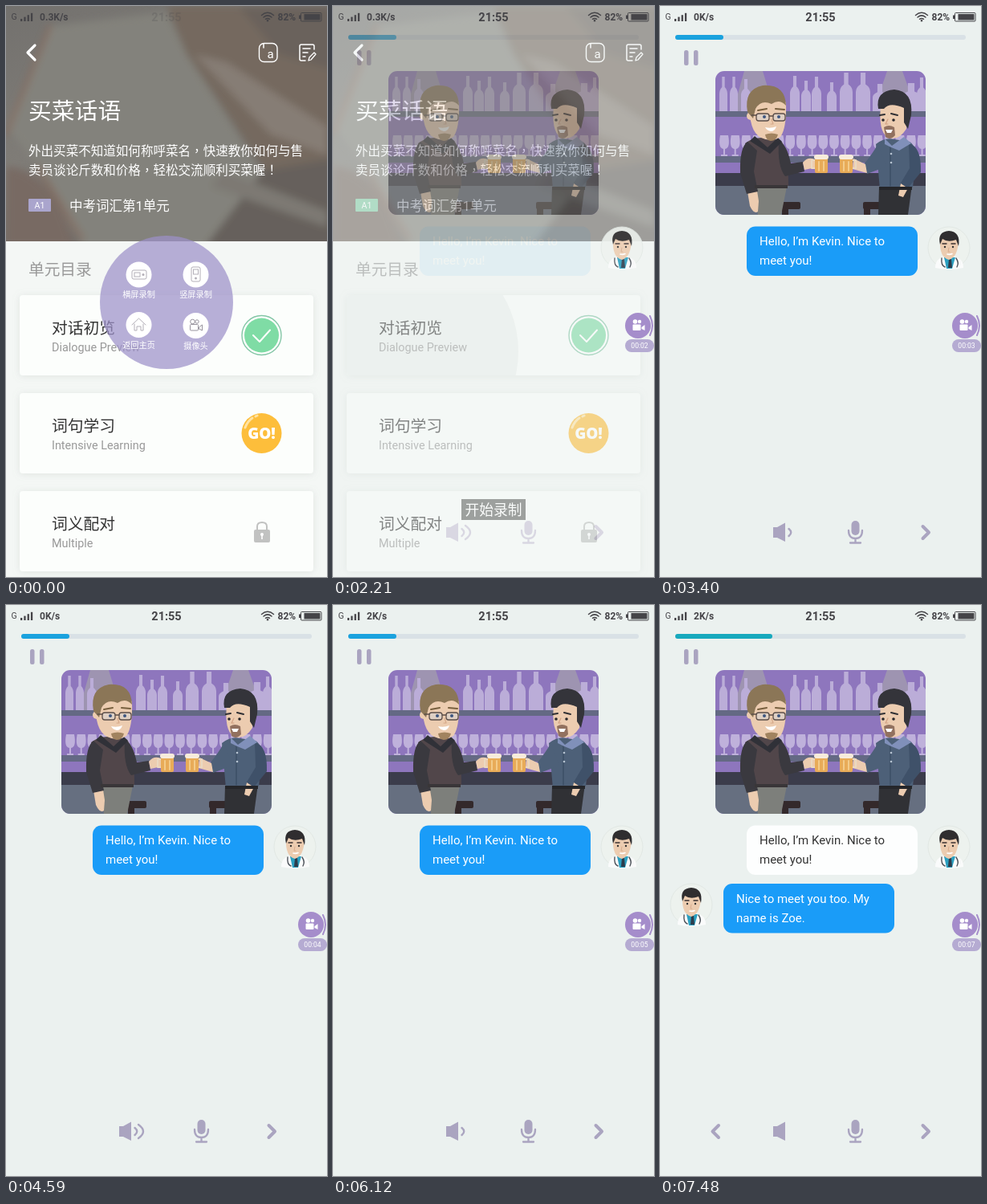
Recreate the animation shown at these times as an HTML page. Size 400 px wide and 711 px high, loop 7650 ms.

```html
<!DOCTYPE html>
<html lang="zh-CN">
<head>
<meta charset="utf-8">
<title>Lesson recording</title>
<style>
  html, body { margin: 0; height: 100%; overflow: hidden; background: #ebf1ef; }
  svg { display: block; width: 100%; height: 100%; }
  text { font-family: Roboto, "Noto Sans CJK SC", "Noto Sans CJK", sans-serif; }
  .mark { font-family: "Noto Sans CJK TC", "Noto Sans CJK", sans-serif; }
  .line { fill: none; stroke-linecap: round; stroke-linejoin: round; }
</style>
</head>
<body>
<svg id="stage" viewBox="0 0 400 711" preserveAspectRatio="none"></svg>
<script>
const LOOP = 7650, STEP = 170;
const ICON = '#aaa4c0', BLUE = '#1a9cf8', SKIN = '#ecccb0';

const attrs = (o = {}) => Object.entries(o).map(([k, v]) => ` ${k}="${v}"`).join('');
// Full-width punctuation sits in the middle of its square
const marks = str => str.replace(/[，！]/g, '<tspan class="mark" lang="zh-TW">$&</tspan>');
const text = (x, y, size, fill, str, o) =>
  `<text x="${x}" y="${y}" font-size="${size}" fill="${fill}"${attrs(o)}>${marks(str)}</text>`;
const mid = { 'text-anchor': 'middle' };
const rect = (x, y, w, h, fill, r = 0, o) =>
  `<rect x="${x}" y="${y}" width="${w}" height="${h}" rx="${r}" fill="${fill}"${attrs(o)}/>`;
const circle = (x, y, r, fill, o) => `<circle cx="${x}" cy="${y}" r="${r}" fill="${fill}"${attrs(o)}/>`;
const path = (d, fill, o) => `<path d="${d}" fill="${fill}"${attrs(o)}/>`;
const line = (d, color, w, o) => `<path class="line" d="${d}" stroke="${color}" stroke-width="${w}"${attrs(o)}/>`;
const group = (id, body, o) => `<g id="${id}"${attrs(o)}>${body}</g>`;

// Bar scene
function bottle([x, w, h]) {
  const n = w * .34, y = k => 131 - h * k;
  return path(`M${x - w} 131V${y(.5)}Q${x - w} ${y(.62)} ${x - n} ${y(.7)}V${y(1)}H${x + n}V${y(.7)}` +
    `Q${x + w} ${y(.62)} ${x + w} ${y(.5)}V131Z`, '#bbadd8');
}
const glass = x => path(`M${x - 5} 161Q${x - 8} 177 ${x - 1} 178V185H${x - 4}V187H${x + 4}V185H${x + 1}V178` +
  `Q${x + 8} 177 ${x + 5} 161Z`, '#bfb1db');
const mug = (x, side) => line(`M${x + 8 + side * 8} 192h${side * 4}v10h${-side * 4}`, '#ead9c2', 2) +
  rect(x, 187, 16, 21, '#e8ab58', 2) + rect(x - 1, 185, 18, 6, '#f7ecdc', 3) +
  line(`M${x + 5} 194v11m6-11v11`, '#f3cb8a', 2);
const stool = x => rect(x, 244, 24, 9, '#33292b', 2) + rect(x + 1, 252, 8, 8, '#33292b');

const leftMan =
  path('M118 224L159 220L151 260H122Z', '#7d7f7b') +
  path('M109 231L112 249Q117 260 122 256L123 243L121 230Z', SKIN) +
  path('M106 171Q116 163 130 164L150 167Q160 176 160 224L119 227L115 200Z', '#51464a') +
  path('M109 169Q99 176 100 208L108 234L122 231L117 206L121 180Z', '#3a393f') +
  path('M148 168Q158 172 163 196L178 194L180 206L156 212Q146 200 148 168Z', '#3a393f') +
  path('M112 168L118 162L134 176L147 164L152 169L137 184Z', '#303138') +
  path('M178 195Q184 187 193 191L194 201L180 204Z', SKIN) +
  rect(118, 223, 41, 4, '#393638') +
  path('M112 120Q110 156 126 164Q138 170 150 163Q158 152 157 120L140 108Z', SKIN) +
  circle(113, 137, 5, SKIN) +
  path('M131 160Q139 157 147 160Q145 168 138 168Q132 167 131 160Z', '#a1835f') +
  path('M109 132Q104 104 128 99Q156 97 157 124Q149 115 139 122Q126 116 119 128L116 140Z', '#8b7657') +
  rect(120, 134, 16, 9, '#dfd0c4', 3, { stroke: '#5c4f4a', 'stroke-width': 1.3 }) +
  rect(141, 134, 15, 9, '#dfd0c4', 3, { stroke: '#5c4f4a', 'stroke-width': 1.3 }) +
  line('M136 137h5M114 136h6', '#5c4f4a', 1.3) +
  circle(130, 138, 2, '#3e5680') + circle(148, 138, 2, '#3e5680') +
  line('M122 130l11-2m11 0l11 1', '#78603f', 2) +
  path('M131 151Q138 153 145 150Q143 156 138 156Q133 155 131 151Z', '#fff') +
  line('M139 141l2 6h-3', '#d5a98a', 1.2);

const rightMan =
  path('M273 225L314 223L309 260H272Z', '#303135') +
  path('M269 172Q280 163 292 166L311 169Q320 174 318 196L315 226L274 228Z', '#4d6078') +
  path('M272 171Q265 184 254 197L258 209L282 200Z', '#4d6078') +
  path('M256 197L241 190L240 203L258 208Z', SKIN) +
  path('M310 171Q326 175 325 207L308 228L299 222L311 202Z', '#3f5169') +
  path('M300 221L309 227L303 238L297 236Z', SKIN) +
  line('M287 174V224', '#35465d', 1) + circle(288, 184, 1.3, '#b8c4d2') + circle(288, 195, 1.3, '#b8c4d2') +
  path('M275 125Q272 155 283 163Q296 170 307 153L309 125L290 112Z', SKIN) +
  path('M279 151Q285 147 292 151L293 161Q287 168 281 163Z', '#92715f') +
  path('M272 128Q268 106 292 104Q316 106 313 136L309 153L304 145V127Q286 119 279 128Z', '#34343a') +
  path('M281 154H290L288 158H283Z', '#fff') +
  circle(278, 142, 1.8, '#29282b') + circle(291, 142, 1.8, '#29282b') +
  line('M274 136l6-1m8-1l8 2', '#303034', 2) +
  line('M284 141l-3 6h3', '#d2a283', 1.2) +
  path('M280 165L289 174L304 163L313 171L298 180L288 176L280 172Z', '#8090ba') +
  rect(273, 225, 41, 4, '#25262a');

const bottles = [[79, 5, 43], [92, 5, 43], [107, 6, 40], [168, 6, 44], [182, 6, 38], [195, 6, 43], [214, 6, 36],
  [232, 8, 48], [253, 9, 48], [274, 9, 34], [313, 12, 35], [326, 6, 42]].map(bottle).join('');
const glasses = Array.from({ length: 19 }, (_, i) => glass(80 + i * 13.7)).join('');

const scene = `<g clip-path="url(#sceneClip)">` +
  rect(69, 81, 262, 179, '#8e76bd') +
  path('M105 81H128L143 131H91ZM283 81H302L320 131H266Z', '#a6a1ad', { opacity: .7 }) +
  bottles + rect(69, 131, 262, 7, '#646984') + glasses + rect(69, 187, 262, 8, '#646984') +
  rect(69, 208, 262, 17, '#3b3c4b') + rect(69, 224, 262, 36, '#666f80') +
  stool(151) + stool(253) + leftMan + rightMan + mug(193, -1) + mug(224, 1) + '</g>';

// Lesson screen
const avatar = (x, y) => `<g transform="translate(${x} ${y})">` +
  circle(0, 0, 26, '#edf2ee', { stroke: '#e2e8e4' }) +
  path('M-17 25Q-17 13 -5 11H6Q18 13 18 25Q0 29 -17 25Z', '#fafbfb') +
  path('M-6 12L-3 26H4L8 12Z', '#2a9fc0') + path('M0 14h3l1 11h-5z', '#2c3c4c') +
  line('M-9 13Q-10 22 -5 24M9 13Q13 19 10 24', '#4b5058', 1.4) +
  path('M-11 -9Q-12 12 0 15Q11 12 12 -9L0 -16Z', SKIN) +
  path('M-11 -4Q-15 -20 0 -21Q15 -20 12 -2L9 -10Q-1 -6 -8 -11Z', '#2f2d2f') +
  line('M-8 -5h5m6 0h5', '#3a3030', 1.4) + circle(-5, -1, 1.2, '#333') + circle(5, -1, 1.2, '#333') +
  line('M-2 8Q1 9 4 7.5', '#fff', 1.6) + line('M0 0l-1 5h2', '#d8ac8e', 1) + '</g>';
const bubble = (id, x, y, a, b) => group(id, rect(x, y, 213, 61.5, BLUE, 11, { class: 'box' }) +
  text(x + 16, y + 23.5, 15, 'inherit', a) + text(x + 16, y + 47.5, 15, 'inherit', b), { fill: '#fff' });

const lesson = rect(0, 0, 400, 711, '#ebf1ef') +
  rect(19, 36, 362, 6, '#d9e1e6', 3) + rect(19, 36, 60, 6, '#1aa2de', 3, { id: 'progress' }) +
  rect(30, 55, 5.5, 19, ICON, 2.5) + rect(42, 55, 5.5, 19, ICON, 2.5) + scene +
  path('M141 649H146L156 643.5V667L146 662H141Z', ICON) +
  line('M160.5 651Q166 655.5 160.5 660', ICON, 2.4, { id: 'wave1' }) +
  line('M165 647Q177 655.5 165 664', ICON, 2.4, { id: 'wave2' }) +
  rect(238.5, 641, 10, 18, ICON, 5) +
  line('M235 653Q235 663 243.5 663T252 653M243.5 663V668M237 668.5H250', ICON, 2.3) +
  line('M327.5 648L335 655.5L327.5 663', ICON, 4) +
  line('M73 648L65.5 655.5L73 663', ICON, 4, { id: 'prev' });

const chat = avatar(360, 301) + bubble('first', 108, 274.5, 'Hello, I’m Kevin. Nice to', 'meet you!') +
  group('reply', avatar(39, 373) + bubble('second', 79, 347, 'Nice to meet you too. My', 'name is Zoe.'));

// Contents screen
const card = (y, title, sub) => rect(17, y, 366, 100, '#fcfefc', 4, { filter: 'url(#shadow)' }) +
  (y == 360 ? circle(95, 430, 0, '#eef2ef', { id: 'ripple', 'clip-path': 'url(#cardClip)' }) : '') +
  text(57, y + 48, 19.8, '#333', title) + text(57, y + 70, 14.4, '#999', sub);

const photo = '<g clip-path="url(#heroClip)">' + rect(0, 0, 400, 293, 'url(#hero)') + '<g filter="url(#blur)">' +
  path('M55 25L200 8L225 60L325 215L280 310H100L40 200L0 150Z', '#83827c') +
  path('M200 0H410V190L330 215L225 60Z', '#75695f') +
  path('M235 60L275 70L400 150V185L330 160Z', '#867d74') +
  path('M290 0H410V80L340 60Z', '#6a625c') +
  path('M0 200Q60 205 85 300H0Z', '#786a63') +
  path('M320 205L410 190V310H240Z', '#66605b') +
  path('M270 205L400 255V275L255 225Z', '#7d7973') +
  line('M55 25L0 160M40 200L95 290', '#86695a', 4) + '</g></g>';

const contents = rect(0, 0, 400, 711, '#f4f7f5') + photo +
  line('M36 49L27 58L36 67', '#fff', 3.2) +
  rect(315.5, 46.5, 22.5, 23, 'none', 6, { stroke: '#fff', 'stroke-width': 1.4 }) +
  line('M321 47V52', '#fff', 1.5) + text(329.5, 64.5, 15, '#fff', 'a', mid) +
  line('M384 54V50Q384 48 382 48H368Q366 48 366 50V66Q366 68 368 68H373M370 53H379M370 58H376M370 63H373', '#fff', 1.5) +
  line('M377 68L378 64L384 58L386 60L380 67Z', '#fff', 1.3) +
  text(28, 141, 28.8, '#fff', '买菜话语') +
  text(28, 186, 15.55, '#fff', '外出买菜不知道如何称呼菜名，快速教你如何与售') +
  text(28, 210, 15.55, '#fff', '卖员谈论斤数和价格，轻松交流顺利买菜喔！') +
  rect(28, 240, 28, 16, '#87cda9', 1, { id: 'badge' }) + text(42, 251.5, 10.5, '#fff', 'A1', mid) +
  text(79, 254.5, 16.5, '#fff', '中考词汇第1单元') +
  text(28, 334.5, 19.7, '#999', '单元目录') +
  card(360, '对话初览', 'Dialogue Preview') + card(482, '词句学习', 'Intensive Learning') + card(604, '词义配对', 'Multiple') +
  circle(318.5, 410, 24.5, '#fff', { stroke: '#84c6a6', 'stroke-width': 1.4 }) + circle(318.5, 410, 21.5, '#7fdca5') +
  line('M308 410L316 418L329 403.5', '#fff', 2) +
  circle(318.5, 532, 25, '#fdbe3b') + line('M298 525Q301 517 307 513M311 511L313 510', '#ffe3a2', 3) +
  text(318.5, 539, 19, '#fff', 'GO!', { ...mid, 'font-weight': 800, style: "font-family:'Open Sans',sans-serif" }) +
  rect(309, 652, 20, 16, '#c1c2c1', 2) + line('M313 652V648Q313 643 319 643T325 648V652', '#c1c2c1', 2) +
  circle(319, 658, 2, '#fff') + rect(318.2, 659, 1.6, 5, '#fff');

// Recorder overlay
const camera = (x, y, fill, stroke) => `<g transform="translate(${x} ${y})" stroke="${stroke}">` +
  circle(-4, -5, 2.8, fill) + circle(1.5, -5, 2.2, fill) +
  rect(-7, -1.5, 10, 7.5, fill, 1) + path('M4 2L8 -1V6L4 4Z', fill) + '</g>';
const option = (x, y, label, icon) => circle(x, y, 16, '#fff') + icon +
  text(x, y + 28.5, 10.2, '#fff', label, { ...mid, 'font-weight': 500 });
const G = '#b3afb8';
const panel = circle(200, 369, 83, '#9d90c9', { opacity: .72 }) +
  option(165.5, 334.5, '横屏录制', rect(157, 329, 18, 11, 'none', 2, { stroke: G }) + rect(160, 332, 7, 5, 'none', 0, { stroke: G }) + circle(171, 334.5, 1.5, G)) +
  option(236.5, 334.5, '竖屏录制', rect(231, 325, 11, 18, 'none', 2, { stroke: G }) + rect(233.5, 328, 6, 6, 'none', 0, { stroke: G }) + circle(236.5, 339, 1.5, G)) +
  option(165.5, 397, '返回主页', line('M157 397L165.5 389L174 397M160 396V404H163V399H168V404H171V396', G, 1)) +
  option(236.5, 398, '摄像头', camera(236.5, 398, 'none', '#98949e'));
const recorder = circle(380, 398, 16, '#a58dcb') + camera(380.5, 398, '#fff', 'none') +
  line('M395 386Q401 398 395 410', '#a58dcb', 2) +
  rect(364, 415, 36, 16, '#b5abd2', 8) + text(382, 426.3, 8.6, '#fff', '00:00', { ...mid, id: 'timer' });
const toast = rect(160, 614, 80, 26, '#646664') + text(200, 634, 17.8, '#fff', '开始录制', mid);

const INK = '#454448', bold = { 'font-weight': 700 };
const status = text(6.5, 17, 10.5, INK, 'G') +
  [0, 1, 2, 3].map(i => rect(18 + i * 4.3, 16 - i * 2.4, 2.3, 3 + i * 2.4, INK)).join('') +
  text(42, 18, 12, INK, '', { ...bold, id: 'speed' }) +
  text(200, 19, 14.5, INK, '21:55', { ...bold, ...mid, id: 'clock' }) +
  line('M318.5 11.5Q326 5 333.5 11.5M321 14Q326 9.8 331 14M323.5 16.3Q326 14.5 328.5 16.3', INK, 1.5) + circle(326, 18.3, 1.2, INK) +
  text(338.5, 18, 12, INK, '82%', bold) +
  rect(367.5, 8.5, 25.5, 10.5, 'none', 1, { stroke: INK }) + rect(371.5, 10, 20, 7.5, INK) + rect(365, 11.5, 2, 4.5, INK);

const defs = `<defs>
  <linearGradient id="hero" x2=".6" y2="1"><stop stop-color="#73716e"/><stop offset=".5" stop-color="#7f7c77"/><stop offset="1" stop-color="#67635f"/></linearGradient>
  <filter id="blur"><feGaussianBlur stdDeviation="5"/></filter>
  <filter id="shadow" x="-10%" y="-20%" width="120%" height="140%"><feDropShadow dx="0" dy="1" stdDeviation="5" flood-color="#8a9a90" flood-opacity=".2"/></filter>
  <clipPath id="sceneClip">${rect(69, 81, 262, 179, '#000', 11)}</clipPath>
  <clipPath id="heroClip">${rect(0, 0, 400, 293, '#000')}</clipPath>
  <clipPath id="cardClip">${rect(17, 360, 366, 100, '#000', 4)}</clipPath></defs>`;

const stage = document.getElementById('stage');
stage.innerHTML = defs + group('lesson', lesson) + group('contents', contents) + group('chat', chat) +
  group('panel', panel) + group('recorder', recorder) + group('toast', toast) + status;

const el = id => document.getElementById(id);
const clamp = v => Math.max(0, Math.min(1, v));
const alpha = (id, v) => el(id).setAttribute('opacity', clamp(v));
const set = (id, key, v) => el(id).setAttribute(key, v);

function draw(now) {
  const t = Math.floor(now % LOOP / STEP) * STEP;
  const replied = t >= 6800;
  const volume = Math.floor((t / 850 + .35) % 1 * 3);

  alpha('panel', 1 - t / 400);
  alpha('recorder', t / 510);
  alpha('toast', Math.min((t - 400) / 300, 1 - (t - 2010) / 500));
  alpha('contents', 1 - (t - 1980) / 540);
  alpha('chat', t >= 2040 ? (t - 1900) / 350 : 0);
  alpha('first', (t - 2185) / 360);
  alpha('clock', t < STEP ? .2 : t < 2040 ? .75 : 1);
  set('badge', 'fill', t < STEP ? '#aaa5cd' : '#87cda9');
  set('ripple', 'r', 136 * clamp((t - 1700) / 510));

  alpha('wave1', volume > 0);
  alpha('wave2', volume > 1);
  alpha('reply', replied);
  alpha('prev', replied);
  set('progress', 'width', replied ? 121 : 60);
  set('progress', 'fill', replied ? '#17a9bd' : '#1aa2de');
  set('first', 'fill', replied ? '#333' : '#fff');
  el('first').querySelector('.box').setAttribute('fill', replied ? '#fdfefe' : BLUE);

  el('timer').textContent = '00:0' + Math.floor((t + 100) / 1050);
  el('speed').textContent = t < 2500 ? '0.3K/s' : t < 5300 ? '0K/s' : '2K/s';
}

const start = performance.now();
function tick() {
  draw(performance.now() - start);
  requestAnimationFrame(tick);
}
tick();
</script>
</body>
</html>
```
